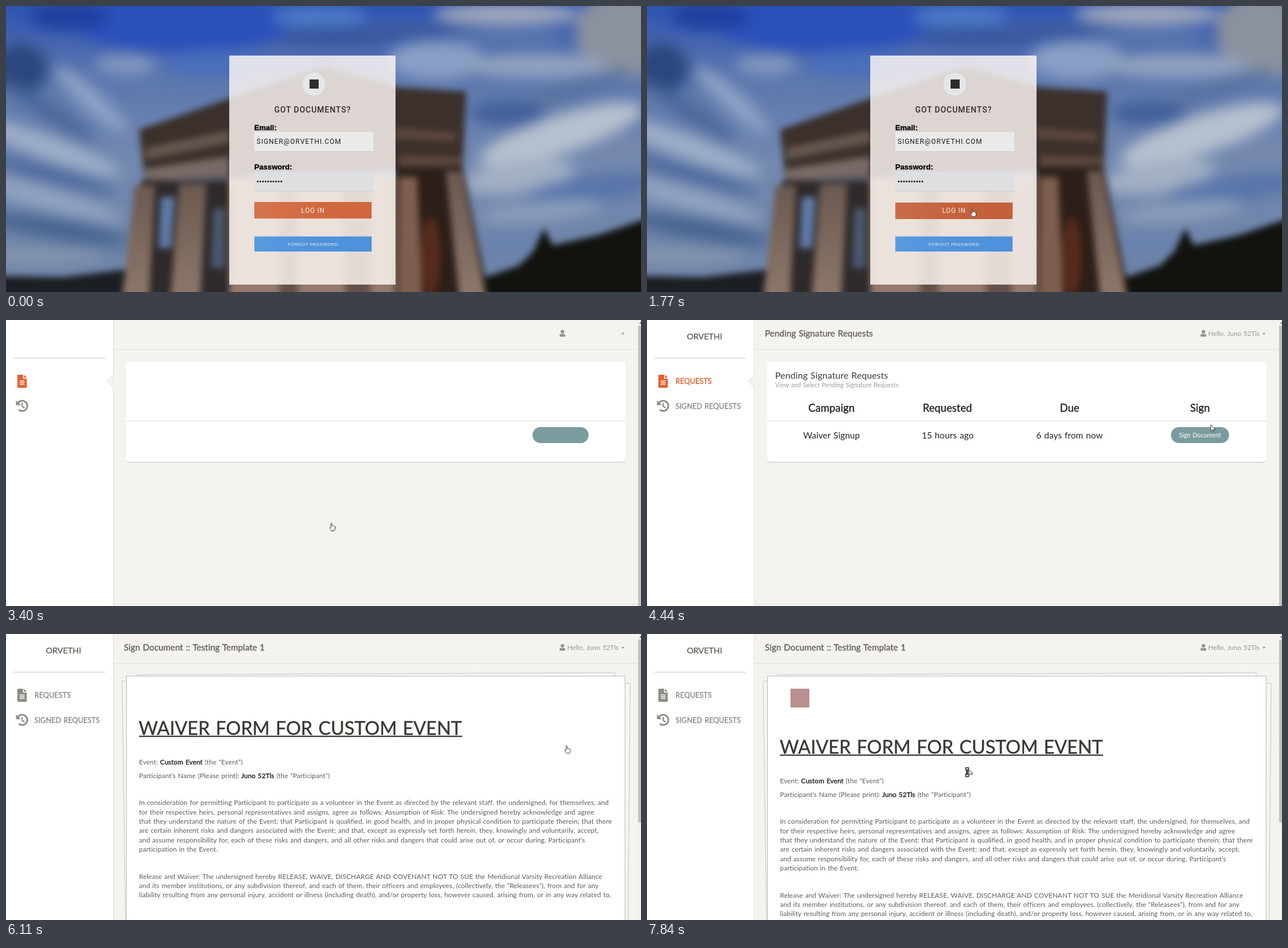
An HTML page for the animation above (8 s loop, 1115 by 502 pixels).

```html
<!DOCTYPE html>
<html lang="en">
<head>
<meta charset="utf-8">
<title>Sign a document</title>
<style>
html, body { margin: 0; width: 100%; height: 100%; overflow: hidden; background: #f4f3ef; }
svg { display: block; width: 100vw; height: 100vh; }
text { fill: currentColor; font-family: Lato, "Open Sans", sans-serif; letter-spacing: .07px; word-spacing: .8px; white-space: pre; }
.b { stroke: currentColor; stroke-width: .4px; }
.mid { text-anchor: middle; }
.login text { font-family: "Liberation Sans", Arial, sans-serif; word-spacing: 0; }
.login .caps { font-family: Roboto, sans-serif; letter-spacing: 1px; }
.sky { filter: blur(12px); }
.temple { filter: blur(6px); }

/* scenes */
.login, .app, .dash, .doc, .late, .logo, .cursor g { animation: 8s step-end infinite; }
.login { animation-name: login; }
.app { animation-name: app; }
.dash { animation-name: dash; }
.doc { animation-name: doc; }
.late { animation-name: late; }
.logo { animation-name: logo; }
.flow { animation: flow 8s step-end infinite; }
.mark { animation: mark 8s step-end infinite; }
@keyframes login { 0% { opacity: 1 } 42.5%, 100% { opacity: 0 } }
@keyframes app { 0% { opacity: 0 } 42.5%, 100% { opacity: 1 } }
@keyframes dash { 0% { opacity: 0 } 42.5% { opacity: 1 } 76.375%, 100% { opacity: 0 } }
@keyframes doc { 0% { opacity: 0 } 76.375%, 100% { opacity: 1 } }
@keyframes late { 0% { opacity: 0 } 44.375%, 100% { opacity: 1 } }
@keyframes logo { 0% { opacity: 0 } 78.375%, 100% { opacity: 1 } }
@keyframes flow { 0% { transform: translateY(-33px) } 78.375%, 100% { transform: none } }
@keyframes mark { 0% { color: #e8602c } 76.375%, 100% { color: #8f8c85 } }

/* buttons */
.enter { transform-origin: 539px 358.5px; animation: enter 8s linear infinite; }
@keyframes enter {
  0%, 10% { fill: #d2683e; transform: none }
  13%, 24% { fill: #c4603a; transform: translateY(.5px) }
  25.25%, 100% { fill: #d66d44; transform: scale(.995, .975) }
}
.pill { animation: pill 8s linear infinite, grow 8s step-end infinite; }
@keyframes pill { 0%, 58.625% { fill: #7b9c9e } 63%, 100% { fill: #437a87 } }
@keyframes grow { 0% { x: 924.5px; width: 98.5px } 44.375%, 100% { x: 920px; width: 102px } }

/* cursor */
.cursor { animation: go 8s linear infinite; }
@keyframes go {
  0%, 3.125% { transform: translate(827px, 415px); animation-timing-function: steps(3, start) }
  5.5625%, 7.5% { transform: translate(714px, 361px); animation-timing-function: steps(6, start) }
  11.4%, 53.625% { transform: translate(571.5px, 356.5px); animation-timing-function: steps(4, start) }
  56.125%, 58.625% { transform: translate(990px, 184px); animation-timing-function: steps(3, start) }
  60.5%, 83.625% { transform: translate(984.5px, 196px); animation-timing-function: steps(6, start) }
  87.525%, 89.875% { transform: translate(665.5px, 186.5px); animation-timing-function: steps(8, start) }
  94.875%, 100% { transform: translate(560px, 234px) }
}
.cursor .arrow { animation-name: arrow; }
.cursor .hand { animation-name: hand; }
.cursor .beam { animation-name: beam; }
.cursor .both { animation-name: both; }
@keyframes arrow {
  0% { opacity: 0 } 3.125% { opacity: 1 } 9.5% { opacity: 0 } 53.625% { opacity: 1 }
  59.25% { opacity: 0 } 68.5% { opacity: 1 } 76.375% { opacity: 0 } 83.625% { opacity: 1 }
  85.6% { opacity: 0 } 92.5% { opacity: 1 } 98%, 100% { opacity: 0 }
}
@keyframes hand {
  0% { opacity: 0 } 9.5% { opacity: 1 } 53.625% { opacity: 0 } 59.25% { opacity: 1 }
  68.5% { opacity: 0 } 76.375% { opacity: 1 } 83.625%, 100% { opacity: 0 }
}
@keyframes beam { 0% { opacity: 0 } 85.6% { opacity: 1 } 92.5%, 100% { opacity: 0 } }
@keyframes both { 0% { opacity: 0 } 98%, 100% { opacity: 1 } }
</style>
</head>
<body>
<svg viewBox="0 0 1115 502" preserveAspectRatio="none">
  <defs>
    <linearGradient id="air" x2="0" y2="1">
      <stop offset="0" stop-color="#2f54b2"/>
      <stop offset=".25" stop-color="#5c77ad"/>
      <stop offset=".55" stop-color="#7389b0"/>
      <stop offset="1" stop-color="#6d83a6"/>
    </linearGradient>
    <linearGradient id="sheen">
      <stop offset="0" stop-color="#fff" stop-opacity=".08"/>
      <stop offset=".35" stop-color="#fff" stop-opacity=".03"/>
      <stop offset=".6" stop-color="#fff" stop-opacity="0"/>
    </linearGradient>
    <linearGradient id="stone" x2="0" y2="1">
      <stop offset="0" stop-color="#6b5950"/>
      <stop offset="1" stop-color="#907a6c"/>
    </linearGradient>
    <path id="tip" d="M0 0V11L2.6 8.6 4.3 12.4 6 11.6 4.4 8H7.8Z"/>
  </defs>

  <g class="login">
    <rect width="1115" height="502" fill="url(#air)"/>
    <g class="sky">
      <ellipse cx="310" cy="30" rx="190" ry="50" fill="#2a50ba"/>
      <ellipse cx="110" cy="18" rx="70" ry="24" fill="#2040a0"/>
      <ellipse cx="370" cy="100" rx="90" ry="24" fill="#4a6fbb"/>
      <ellipse cx="550" cy="20" rx="85" ry="20" fill="#4b79c6"/>
      <ellipse cx="590" cy="52" rx="115" ry="14" fill="#35539a"/>
      <ellipse cx="25" cy="110" rx="48" ry="45" fill="#2c477f"/>
      <ellipse cx="210" cy="103" rx="55" ry="18" fill="#8196c0"/>
      <ellipse cx="150" cy="165" rx="85" ry="18" fill="#8ea2c6" transform="rotate(42 150 165)"/>
      <ellipse cx="75" cy="185" rx="95" ry="15" fill="#4b6698" transform="rotate(32 75 185)"/>
      <ellipse cx="70" cy="247" rx="140" ry="20" fill="#9fafc8" transform="rotate(20 70 247)"/>
      <ellipse cx="70" cy="293" rx="130" ry="11" fill="#46639a" transform="rotate(16 70 293)"/>
      <ellipse cx="70" cy="338" rx="140" ry="18" fill="#93a4c0" transform="rotate(15 70 338)"/>
      <ellipse cx="90" cy="392" rx="130" ry="17" fill="#45628f" transform="rotate(10 90 392)"/>
      <ellipse cx="45" cy="440" rx="130" ry="16" fill="#8393ab"/>
      <ellipse cx="755" cy="95" rx="85" ry="34" fill="#8a9fc6"/>
      <ellipse cx="720" cy="46" rx="110" ry="12" fill="#3b5a9b"/>
      <ellipse cx="880" cy="15" rx="130" ry="20" fill="#a0a8ba"/>
      <ellipse cx="1080" cy="50" rx="80" ry="80" fill="#8b919e"/>
      <ellipse cx="880" cy="58" rx="110" ry="15" fill="#5c77ac"/>
      <ellipse cx="930" cy="105" rx="130" ry="22" fill="#91a2bf"/>
      <ellipse cx="985" cy="150" rx="120" ry="14" fill="#5a729f" transform="rotate(-18 985 150)"/>
      <ellipse cx="880" cy="188" rx="65" ry="22" fill="#42609a"/>
      <ellipse cx="975" cy="225" rx="150" ry="34" fill="#b6c0ce" transform="rotate(-18 975 225)"/>
      <ellipse cx="1080" cy="255" rx="55" ry="20" fill="#7488ac" transform="rotate(-15 1080 255)"/>
      <ellipse cx="900" cy="300" rx="100" ry="28" fill="#a2afc4" transform="rotate(-8 900 300)"/>
      <ellipse cx="1030" cy="322" rx="120" ry="24" fill="#5874a9" transform="rotate(-8 1030 322)"/>
      <ellipse cx="940" cy="360" rx="110" ry="18" fill="#8b9dba" transform="rotate(-6 940 360)"/>
      <ellipse cx="885" cy="415" rx="60" ry="24" fill="#6a83ae"/>
    </g>
    <g class="temple">
      <path fill="#1b1e22" d="M-20 474L100 476 215 462V530H-20Z"/>
      <path fill="#12130f" d="M835 478L900 456 925 432 945 390 960 420 1040 402 1140 368V530H830Z"/>
      <path fill="#3b302b" d="M234 217L392 162 560 106 690 143 808 150 802 285 392 302 243 306Z"/>
      <path fill="#65564f" d="M245 249L392 218V240L245 270Z"/>
      <path fill="#786a66" d="M242 286L392 264V298L245 308Z"/>
      <path fill="#5d473d" d="M684 214L790 222V238L684 232ZM690 262L800 265V280H690Z"/>
      <path fill="#2e2a2a" d="M238 306H400V530H205Z"/>
      <path fill="url(#stone)" d="M226 315H262L250 530H202ZM304 312H352L340 530H288Z"/>
      <path fill="#5f7aa6" d="M272 335H296L290 425H268Z"/>
      <path fill="#4b586d" d="M364 355H384V460H360Z"/>
      <path fill="#95796b" d="M392 302H684V530H392Z"/>
      <path fill="#64504a" d="M480 320H512V530H480ZM590 320H640V530H597Z"/>
      <path fill="#2c1e18" d="M684 285H802L852 530H684Z"/>
      <path fill="#7d5f4f" d="M690 300H722L732 530H688Z"/>
      <path fill="url(#stone)" d="M772 290H800L846 530H798Z"/>
      <ellipse cx="746" cy="440" rx="17" ry="70" fill="#562b1b"/>
    </g>

    <rect x="392" y="87" width="292" height="402" fill="#fff9f6" fill-opacity=".82"/>
    <circle cx="540.5" cy="137" r="21" fill="#e6e5e8" stroke="#d3d1d3"/>
    <rect x="533" y="129" width="16" height="16" fill="#2d2b2d"/>
    <g color="#33282a"><text class="mid caps" x="538.5" y="186.5" font-size="14" font-weight="500">GOT DOCUMENTS?</text></g>
    <g color="#0c0a0a" font-size="13" font-weight="700">
      <text class="b" x="436" y="217.5">Email:</text>
      <text class="b" x="436" y="287">Password:</text>
    </g>
    <rect x="436" y="221" width="209" height="34" fill="#ebeaeb"/>
    <rect x="436" y="291" width="209" height="34" fill="#dedfe0"/>
    <path d="M436 255.5H645M436 325H645" stroke="#c9c7c8"/>
    <g color="#1c1a1b"><text class="caps" x="440" y="242" font-size="12">SIGNER@ORVETHI.COM</text></g>
    <path d="M442 308H484" stroke="#111" stroke-width="3.1" stroke-linecap="round" stroke-dasharray="0 4.6"/>
    <g class="enter">
      <rect x="436" y="344" width="206" height="29"/>
      <rect x="436" y="344" width="206" height="29" fill="url(#sheen)"/>
    </g>
    <rect x="436" y="404.5" width="206" height="26.5" fill="#4c92dc"/>
    <rect x="436" y="404.5" width="206" height="26.5" fill="url(#sheen)"/>
    <g color="#f8efeb">
      <text class="mid caps" x="539" y="362.5" font-size="12" style="letter-spacing:.7px">LOG IN</text>
      <text class="mid" x="539" y="420.5" font-size="8" style="letter-spacing:.45px">FORGOT PASSWORD</text>
    </g>
  </g>

  <g class="app">
    <rect width="1115" height="502" fill="#f4f3ef"/>
    <rect width="188" height="502" fill="#fff"/>
    <path d="M188.5 0V502M189 51.5H1110" stroke="#dfddd9"/>
    <path d="M13 67H174" stroke="#d8d7d3" stroke-width="1.6"/>
    <g class="mark">
      <path fill="currentColor" d="M21.5 96H30V103H36.5V117.5Q36.5 119 35 119H21.5Q20 119 20 117.5V97.5Q20 96 21.5 96ZM31.5 96L36.5 101.5H31.5Z"/>
      <path d="M24 107H32.5M24 110H32.5M24 113H32.5" stroke="#fff" stroke-width="1.5"/>
      <g class="late"><text class="b" x="50" y="112" font-size="12.7">REQUESTS</text></g>
    </g>
    <g color="#8f8c85">
      <g fill="none" stroke="currentColor">
        <path d="M20.5 146.5A9 9 0 1 1 22.5 157.5" stroke-width="3"/>
        <path d="M28.5 145.5V151.5L32.5 154.5" stroke-width="2.3"/>
      </g>
      <path fill="currentColor" d="M17.5 141V149.5H26Z"/>
      <g class="late"><text class="b" x="50" y="156" font-size="12.7">SIGNED REQUESTS</text></g>
    </g>
    <g color="#96938d">
      <circle cx="977" cy="20.6" r="3.1" fill="currentColor"/>
      <path fill="currentColor" d="M972 29.3V27Q972 24.4 975 24.2Q977 25.3 979 24.2Q982 24.4 982 27V29.3Z"/>
      <path fill="currentColor" d="M1080.3 22.8H1086.3L1083.3 25.8Z"/>
      <g class="late"><text x="985.5" y="27.7" font-size="11.6">Hello, Juno 52Tls</text></g>
    </g>
    <g class="late" color="#66615b"><text class="b mid" x="101" y="33.5" font-size="14.3">ORVETHI</text></g>
    <rect x="1110" width="5" height="502" fill="#f1f1f1"/>
    <path d="M1111.5 6.5L1115 3V6.5Z" fill="#777"/>

    <g class="dash">
      <path d="M188.5 96L177.5 107.5 188.5 119" fill="#f4f3ef" stroke="#dfddd9"/>
      <path d="M189 498.5H1110" stroke="#dfddd9"/>
      <rect x="1110" y="10" width="5" height="492" fill="#c1c1c1"/>
      <rect x="211" y="74.5" width="876" height="176" rx="5" fill="#d5d3ce"/>
      <rect x="211" y="73" width="876" height="176" rx="5" fill="#fff"/>
      <path d="M211 177.5H1087" stroke="#d6d4d0"/>
      <rect class="pill" x="920" y="188" width="102" height="28" rx="14"/>
      <g class="late">
        <g color="#66615b"><text class="b" x="207" y="28.5" font-size="15.3">Pending Signature Requests</text></g>
        <g color="#3d3a36"><text x="225" y="103" font-size="16">Pending Signature Requests</text></g>
        <g color="#9a9a98"><text x="225" y="118" font-size="10.8">View and Select Pending Signature Requests</text></g>
        <g color="#252422">
          <g font-size="18.5">
            <text class="b mid" x="324" y="161">Campaign</text>
            <text class="b mid" x="527.5" y="161">Requested</text>
            <text class="b mid" x="742" y="161">Due</text>
            <text class="b mid" x="971" y="161">Sign</text>
          </g>
          <g font-size="15.5">
            <text class="mid" x="324" y="208">Waiver Signup</text>
            <text class="mid" x="528" y="208">15 hours ago</text>
            <text class="mid" x="742" y="208">6 days from now</text>
          </g>
        </g>
        <g color="#fff"><text class="mid" x="971" y="206" font-size="10.7">Sign Document</text></g>
      </g>
    </g>

    <g class="doc">
      <rect x="1110" y="10" width="5" height="321" fill="#c1c1c1"/>
      <g color="#66615b"><text class="b" x="207" y="28.5" font-size="15.2">Sign Document :: Testing Template 1</text></g>
      <g fill="#f6f5f2" stroke="#c6c4c0">
        <path d="M204 82.5L1096 86.5 1092 510H210Z"/>
        <path d="M230 71.5L1069.5 68 1070 90H230Z"/>
      </g>
      <rect x="211.5" y="74" width="875.5" height="440" fill="#fff" stroke="#b9b7b3"/>
      <rect class="logo" x="252" y="96" width="33" height="33" fill="#b98f8f"/>
      <g class="flow" color="#5f5b57" font-size="11.9">
        <g color="#3a3732">
          <text class="b" x="233" y="210" font-size="32.6" style="letter-spacing:0;word-spacing:2px">WAIVER FORM FOR CUSTOM EVENT</text>
          <rect x="233.5" y="211.5" width="567.5" height="2.3" fill="currentColor"/>
        </g>
        <text x="233.5" y="262">Event: <tspan class="b" color="#252422" style="fill:#252422">Custom Event</tspan> (the “Event”)</text>
        <text x="233.5" y="286">Participant’s Name (Please print): <tspan class="b" color="#252422" style="fill:#252422">Juno 52Tls</tspan> (the “Participant”)</text>
        <text y="316.7">
          <tspan x="233.5" dy="16.4">In consideration for permitting Participant to participate as a volunteer in the Event as directed by the relevant staff, the undersigned, for themselves, and</tspan>
          <tspan x="233.5" dy="16.4">for their respective heirs, personal representatives and assigns, agree as follows: Assumption of Risk: The undersigned hereby acknowledge and agree</tspan>
          <tspan x="233.5" dy="16.4">that they understand the nature of the Event; that Participant is qualified, in good health, and in proper physical condition to participate therein; that there</tspan>
          <tspan x="233.5" dy="16.4">are certain inherent risks and dangers associated with the Event; and that, except as expressly set forth herein, they, knowingly and voluntarily, accept,</tspan>
          <tspan x="233.5" dy="16.4">and assume responsibility for, each of these risks and dangers, and all other risks and dangers that could arise out of, or occur during, Participant’s</tspan>
          <tspan x="233.5" dy="16.4">participation in the Event.</tspan>
          <tspan x="233.5" dy="47.4">Release and Waiver: The undersigned hereby RELEASE, WAIVE, DISCHARGE AND COVENANT NOT TO SUE the Meridional Varsity Recreation Alliance</tspan>
          <tspan x="233.5" dy="16.4">and its member institutions, or any subdivision thereof, and each of them, their officers and employees, (collectively, the “Releasees”), from and for any</tspan>
          <tspan x="233.5" dy="16.4">liability resulting from any personal injury, accident or illness (including death), and/or property loss, however caused, arising from, or in any way related to,</tspan>
        </text>
      </g>
    </g>
  </g>

  <g class="cursor" fill="#fff" stroke="#222" stroke-width=".9" stroke-linejoin="round">
    <g class="arrow"><use href="#tip"/></g>
    <g class="hand"><path d="M-.9 .6Q0 -.6 .9 .6V5L2.2 4.6 2.9 5.2 4.2 5 4.8 5.7Q6.2 5.6 6.3 7V9.5L5 13.2H-.4L-3.3 8.6Q-3.6 7 -2 7.3L-.9 8.4Z"/></g>
    <g class="beam"><path fill="none" d="M-2.5 -8H2.5M0 -8V8M-2.5 8H2.5"/></g>
    <g class="both">
      <path stroke-width="1.4" d="M-.5 .7H4.8V4.5H3.6V12.5H4.8V16.5H-.5V12.5H.7V4.5H-.5Z"/>
      <path d="M2.1 3V14" stroke-width="1.2"/>
      <use href="#tip" transform="translate(5 5) rotate(-12) scale(.78)"/>
    </g>
  </g>
</svg>
</body>
</html>
```
